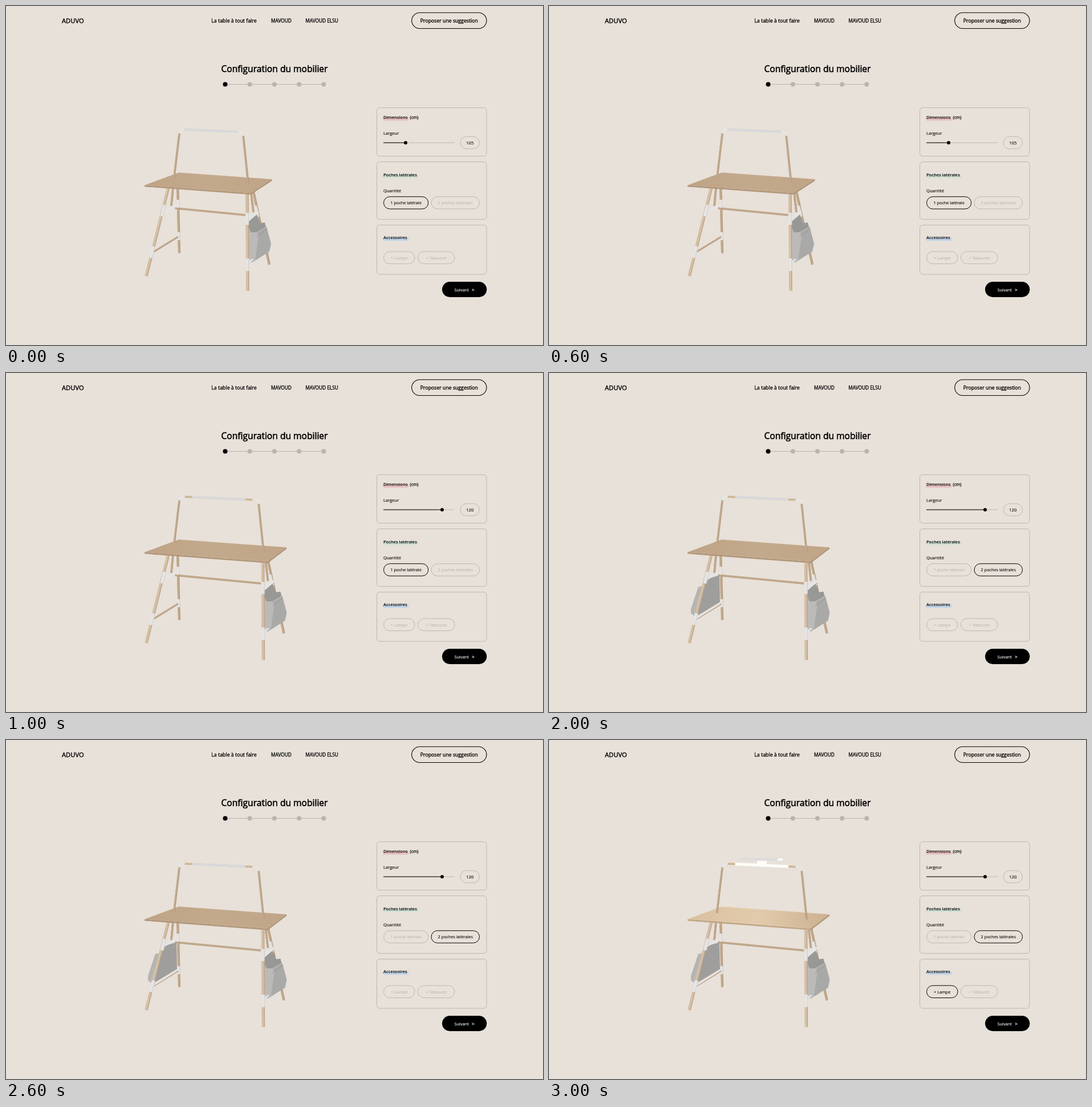
Animation of 942x595 px, one loop 4000 ms. Source, as an HTML page:

```html
<!DOCTYPE html>
<html lang="fr">
<head>
<meta charset="utf-8">
<title>Configuration du mobilier</title>
<style>
html, body { margin: 0; width: 100%; height: 100%; overflow: hidden; background: #e8e1d9; }
svg { display: block; }
text { font-family: "Open Sans", "Noto Sans", sans-serif; white-space: pre; }
</style>
</head>
<body>
<svg id="stage" width="942" height="595" viewBox="0 0 942 595"></svg>
<script>
const stage = document.getElementById("stage");
const GREY = "#bcb7b0", WHITE = "#e6e5e5", WOOD = "#d6c1a6", TAN = "#c3aa8d", SHADE = "#b0977b";

// A medium weight is a regular one with a hairline outline
const text = (x, y, size, str, { weight = 400, medium = 0, fill = "#000", anchor = "start" } = {}) =>
  `<text x="${x}" y="${y}" font-size="${size}" font-weight="${weight}" fill="${fill}" stroke="${fill}"
    stroke-width="${medium * size * .035}" text-anchor="${anchor}">${str}</text>`;
const box = (x, y, x2, y2, r, stroke, fill = "none", w = 1) =>
  `<rect x="${x}" y="${y}" width="${x2 - x}" height="${y2 - y}" rx="${r}" stroke="${stroke}" stroke-width="${w}" fill="${fill}"/>`;
const line = (x, y, x2, y2, stroke, w) =>
  `<path d="M${x} ${y}L${x2} ${y2}" stroke="${stroke}" stroke-width="${w}"/>`;
const curve = (d, stroke, w) =>
  `<path d="${d}" fill="none" stroke="${stroke}" stroke-width="${w}" stroke-linecap="round"/>`;
const poly = (points, fill) => `<polygon points="${points}" fill="${fill}"/>`;
const dot = (x, y, r, fill) => `<circle cx="${x}" cy="${y}" r="${r}" fill="${fill}"/>`;
const move = (x, y, body) => `<g transform="translate(${x} ${y})">${body}</g>`;

// Round wooden stick: shaded body with a lighter side
const stick = (x, y, x2, y2, w, body = WOOD, shade = "#bca488") =>
  line(x, y, x2, y2, shade, w) + line(x - w * .13, y, x2 - w * .13, y2, body, w * .68);
const thin = (x, y, x2, y2, w) => stick(x, y, x2, y2, w, TAN, SHADE);
const sleeve = (x, y, x2, y2, w) => stick(x, y, x2, y2, w, WHITE, "#d9d7d6");

function pill(x, y, x2, y2, label, on) {
  const fill = on ? "#000" : GREY;
  return box(x, y, x2, y2, (y2 - y) / 2, fill) +
    text((x + x2) / 2, (y + y2) / 2 + 3, 7.3, label, { fill, anchor: "middle", medium: .4 });
}

function header() {
  const mid = { medium: 1, anchor: "middle" };
  let out = text(98, 29.5, 11.2, "ADUVO", { medium: 1 }) +
    text(400, 29, 8.8, "La table à tout faire", mid) +
    text(483, 29, 8.3, "MAVOUD", mid) +
    text(554, 29, 8.3, "MAVOUD ELSU", mid) +
    box(711.7, 11.7, 843, 39.5, 13.9, "#000", "none", 1.1) +
    text(777.3, 28.6, 8.7, "Proposer une suggestion", mid) +
    text(471, 115.5, 15.6, "Configuration du mobilier", mid) +
    line(384.5, 137.5, 557.5, 137.5, "#b8b4ae", 1.2);
  for (let i = 0; i < 5; i++) out += dot(384.5 + i * 43.2, 137.5, 4, i ? "#b8b4ae" : "#000");
  return out;
}

function panels({ wide, two, lamp }) {
  const knob = wide ? 765 : 701, bold = { weight: 600 }, soft = { medium: .4 };
  return box(650.5, 178.5, 843, 263.5, 5, GREY) +
    box(650.5, 273.5, 843, 374.5, 5, GREY) +
    box(650.5, 384.5, 843, 471, 5, GREY) +
    box(661, 195, 706.5, 201.3, 3, "none", "#e6bfc0") +
    box(661, 296, 723.5, 301.5, 2.5, "none", "#cbddd0") +
    box(661, 406, 706.5, 412.3, 3, "none", "#c3d5e6") +
    text(662, 197.7, 7.5, "Dimensions", bold) + text(708.5, 197.7, 7.5, "(cm)", { medium: 1 }) +
    text(662, 225.8, 7.6, "Largeur", soft) +
    line(662, 240, 787, 240, GREY, 1.1) + line(662, 240, knob, 240, "#000", 1.1) + dot(knob, 240, 3, "#000") +
    box(797, 229.3, 830.5, 250.7, 10.7, GREY) +
    text(813.7, 243, 7.8, wide ? 120 : 105, { anchor: "middle", medium: .4 }) +
    text(662, 298.5, 7.5, "Poches latérales", bold) +
    text(662, 327, 7.6, "Quantité", soft) +
    pill(662.5, 334.7, 740.7, 356.2, "1 poche latérale", !two) +
    pill(746, 334.7, 830.5, 356.2, "2 poches latérales", two) +
    text(662, 409, 7.5, "Accessoires", bold) +
    pill(662.5, 431, 717, 452.5, "+ Lampe", lamp) +
    pill(722.5, 431, 787, 452.5, "+ Tabouret", false) +
    box(765, 484, 843.3, 511, 13.5, "none", "#000") +
    text(786.5, 500.5, 7.4, "Suivant", { fill: "#fff", medium: .4 }) +
    text(817.3, 500.5, 7.8, "&gt;", { fill: "#fff", medium: 1 });
}

const leftPocket = () =>
  poly("262,375 271,374 280,361 258,429 249,422 249,414", "#b5b4b2") +
  poly("270,375 279,361 299,355 300,402 257,428", "#9f9e9d") +
  curve("M262 376L269 375L254 425", "#c6c4c2", 1) +
  line(258, 431, 301, 404, WHITE, 2.2);

const rightPocket = () =>
  poly("426,378 440,366 446,381 454,380 456,388 440,402 426,399", "#989897") +
  poly("426,387 428,398 439,397 457,387 465,417 462,431 432,450 426,446", "#a9a9a8") +
  poly("426,390 430,398 440,397 443,404 437,447 431,450 426,446", "#bbbab8") +
  curve("M427 398L439 398L457 388", "#c3c1bf", 1) +
  curve("M440 405L458 391", "#929191", .8);

const leftLegs = pocket =>
  thin(293, 318, 290, 351, 3.6) +
  thin(301.2, 318, 304, 433.5, 4.2) +
  sleeve(301.5, 340, 302, 354, 4.8) + sleeve(303, 397, 303.4, 411, 4.8) +
  thin(258, 432, 302, 405, 3) +
  (pocket ? leftPocket() : "") +
  curve("M277 361Q284 357 288 355L298 350", WHITE, 4.4) +
  stick(285, 318, 246, 474, 5.2) +
  sleeve(278.5, 349, 273.5, 369, 6.2) + sleeve(259, 422, 254, 442, 6.2);

const backLegs = () =>
  thin(430, 329, 434, 362, 3.6) +
  thin(434, 326, 462, 454, 4.2) +
  sleeve(437.5, 351, 442, 370, 5.6);

const frontLeg = () =>
  curve("M426 373L441 362", WHITE, 4.4) +
  rightPocket() +
  curve("M426 449L432 445", WHITE, 3) +
  stick(423, 330, 424, 500, 5.4) +
  sleeve(423, 363, 423.2, 384, 6.2) + sleeve(423.7, 443, 423.8, 465, 6.2);

function rail(wide, lamp) {
  const d = wide ? 27 : 0, dy = wide ? 2 : 0;
  const x = 410 + d, y = 220.8 + dy;
  const [a, b] = wide ? [326.5, 420] : [314, 407];
  const yAt = u => 217 + (u - 310) / (x - 310) * (y - 217);
  return thin(294.5, 304, 304.3, 222, 3.5) +
    thin(416 + d, 226 + dy, 425 + d, 313 + dy, 3.5) +
    line(310, 217, x, y, "#ceb595", 3.5) +
    curve("M304.3 222Q305 217 312 217", WHITE, 3.9) +
    curve(`M${x - 3} ${y}Q${x + 5.3} ${y} ${x + 6} ${y + 5.5}`, WHITE, 3.9) +
    line(a, yAt(a), b, yAt(b), lamp ? "#fffdf8" : "#d9d8dc", lamp ? 5 : 4.2);
}

const lampHead = () =>
  poly("334,211.5 339,206 404,207.5 411,210 407,212", "#dddcda") +
  poly("400,211.5 402,208 408,207.5 411,210 409,211.5", "#fffdf8") +
  poly("365,212 382,212 382,218 365,218", "#fffdf8");

function desk(wide, lamp) {
  const back = wide ? [492, 306] : [466.5, 304], front = wide ? [459, 331] : [429, 328.3];
  const low = ([x, y]) => [x, y + 2.8];
  const shades = lamp ? ["#dac1a0", "#e3ccae", "#ccb191"] : ["#bfa487", "#c4aa8d", "#c0a588"];
  const stops = shades.map((c, i) => `<stop offset="${i / 2}" stop-color="${c}"/>`).join("");
  let out = `<linearGradient id="top">${stops}</linearGradient>` +
    poly([[243, 314.5], front, low(front), low([243, 314.5])], lamp ? "#c2a685" : "#b2967a") +
    poly([front, back, low(back), low(front)], "#ab9073") +
    poly([[243, 314.5], [303, 292.3], back, front], "url(#top)");
  // Faint grain running along the board
  for (let i = 1; i < 6; i++) {
    const k = i / 6;
    out += line(243 + 60 * k, 314.5 - 22.2 * k, front[0] + (back[0] - front[0]) * k,
      front[1] + (back[1] - front[1]) * k, "#a5835f18", .8);
  }
  return out;
}

function table({ wide, two, lamp }) {
  const shift = wide ? 1 : 0;
  return thin(297, 355, 421 + 28 * shift, 367 + 2.5 * shift, 3.6) +
    leftLegs(two) +
    move(25.5 * shift, 3 * shift, backLegs()) +
    move(27.5 * shift, 3.8 * shift, frontLeg()) +
    desk(wide, lamp) + (lamp ? lampHead() : "") + rail(wide, lamp);
}

let shown = -1;
function tick(now) {
  const step = Math.floor(now / 1000) % 4;
  if (step !== shown) {
    shown = step;
    const state = { wide: step > 0, two: step > 1, lamp: step > 2 };
    stage.innerHTML = header() + panels(state) + table(state);
  }
  requestAnimationFrame(tick);
}
tick(performance.now());
</script>
</body>
</html>
```
